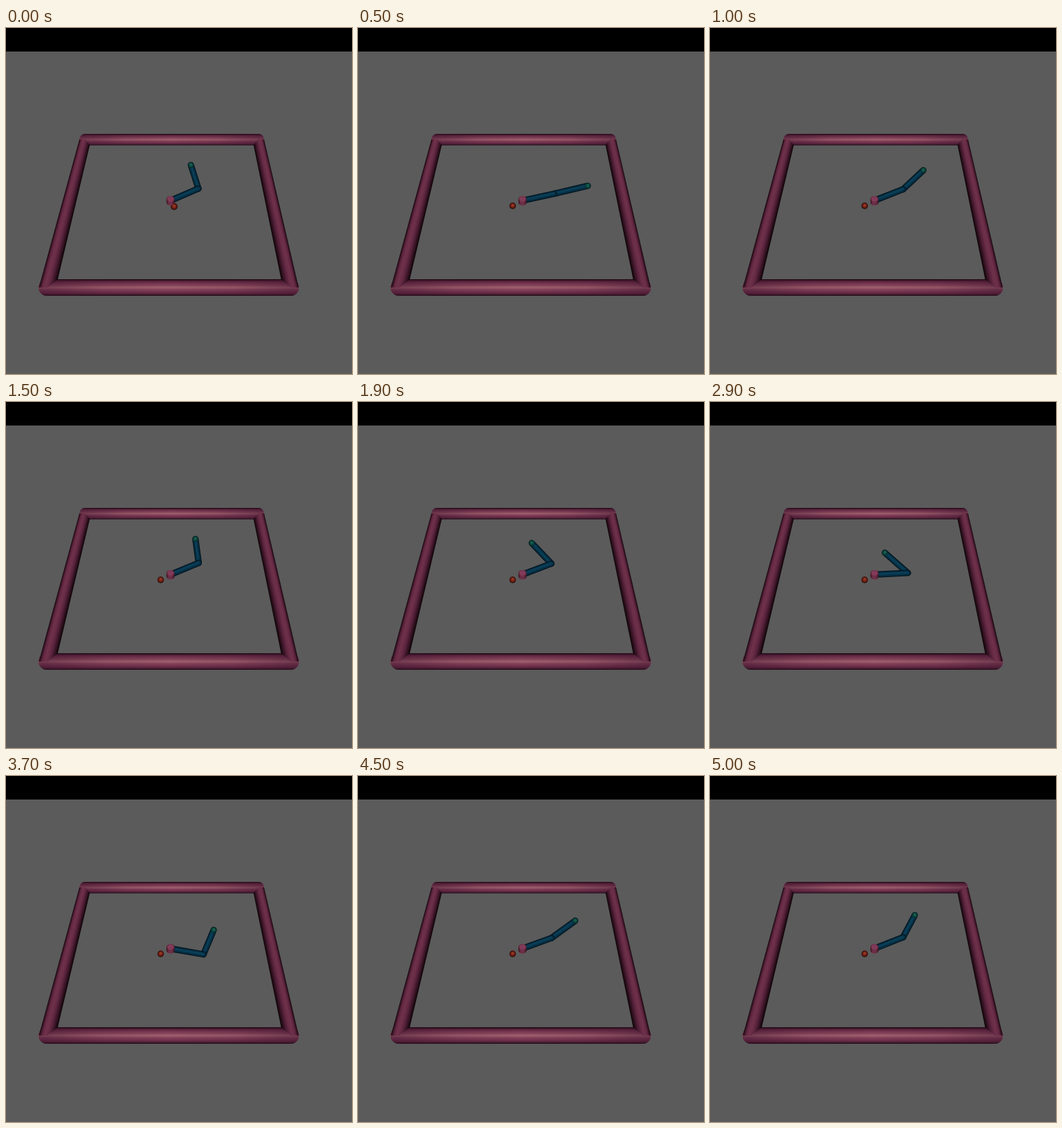
Recreate the animation shown at these times as an HTML page with a canvas. Size 500 px wide and 500 px high, loop 5100 ms.

```html
<!DOCTYPE html>
<html lang="en">
<head>
<meta charset="utf-8">
<title>Two-link arm</title>
<style>
html, body { margin: 0; width: 100%; height: 100%; overflow: hidden; background: #5b5b5b; }
canvas { display: block; width: 500px; height: 500px; }
</style>
</head>
<body>
<canvas id="stage" width="500" height="500"></canvas>
<script>
const ctx = document.getElementById('stage').getContext('2d');
const LOOP = 5100, STEP = 100;
const LINK = [0.1, 0.111];
const BACK = 161, FRONT = 375;

// time (ms), shoulder heading, forearm heading (degrees)
const keys = [
  [100, 2, 0], [500, 17, 18], [1000, 29, 51.7], [1900, 28, 121.5],
  [2400, 18, 130], [2900, 4, 127], [3300, -9, 103], [3700, -13.7, 70.4],
  [4200, 12, 49], [4500, 27, 45], [5000, 29, 67.4]
];

function slope(i, col) {
  const a = keys[Math.max(i - 1, 0)], b = keys[Math.min(i + 1, keys.length - 1)];
  return (b[col] - a[col]) / (b[0] - a[0]);
}

// Cubic Hermite through the keys
function sample(t, col) {
  let i = 0;
  while (i < keys.length - 2 && t > keys[i + 1][0]) i++;
  const a = keys[i], b = keys[i + 1], span = b[0] - a[0];
  const u = (t - a[0]) / span, v = 1 - u;
  return a[col] * (1 + 2 * u) * v * v + b[col] * u * u * (3 - 2 * u)
    + span * (slope(i, col) * u * v * v - slope(i + 1, col) * u * u * v);
}

// Perspective view of the table plane
function project(x, y) {
  const depth = 1 + 0.547 * y;
  return [237.5 + 486.6 * x / depth, -384.6 + 634 / depth];
}

function addStops(g, colors) {
  colors.forEach((c, i) => g.addColorStop(i / (colors.length - 1), c));
  return g;
}

const gradient = (x0, y0, x1, y1, colors) =>
  addStops(ctx.createLinearGradient(x0, y0, x1, y1), colors);

function ball(x, y, r, colors) {
  ctx.fillStyle = addStops(ctx.createRadialGradient(x, y - r * 0.25, 0, x, y, r), colors);
  ctx.beginPath();
  ctx.arc(x, y, r, 0, 7);
  ctx.fill();
}

function stroke(points, width, color) {
  ctx.lineCap = ctx.lineJoin = 'round';
  ctx.lineWidth = width;
  ctx.strokeStyle = color;
  ctx.beginPath();
  points.forEach(p => ctx.lineTo(...p));
  ctx.stroke();
}

// Edges are given as x at the back and front axes; the ends are mitred
function sideRail(outer, inner) {
  const at = (edge, y) => edge[0] + (edge[1] - edge[0]) * (y - BACK) / (FRONT - BACK);
  const axis = y => (at(outer, y) + at(inner, y)) / 2;
  const colors = ['#1a080f', '#5f2540', '#6f314a', '#682c46', '#522039', '#32111f', '#0a0306'];
  ctx.save();
  ctx.beginPath();
  ctx.moveTo(axis(BACK), BACK);
  ctx.lineTo(at(inner, 169), 169);
  ctx.lineTo(at(inner, 363), 363);
  ctx.lineTo(axis(FRONT), FRONT);
  ctx.lineTo(outer[1], FRONT);
  ctx.lineTo(outer[0], BACK);
  ctx.clip();
  for (let y = BACK; y < FRONT; y++) {
    ctx.fillStyle = gradient(at(outer, y), 0, at(inner, y), 0, colors);
    ctx.fillRect(0, y, 500, 1);
  }
  ctx.restore();
}

function crossRail(x, y, w, h) {
  ctx.fillStyle = gradient(0, y, 0, y + h,
    ['#12060b', '#5a233c', '#75364f', '#85445a', '#a3636f', '#85425b', '#75344f', '#5c263f', '#1a0a11']);
  ctx.beginPath();
  ctx.roundRect(x, y, w, h, h / 2);
  ctx.fill();
  ctx.fillStyle = gradient(x, 0, x + w, 0,
    ['rgba(55,15,40,.45)', 'rgba(55,15,40,.12)', 'rgba(55,15,40,0)', 'rgba(55,15,40,.12)', 'rgba(55,15,40,.45)']);
  ctx.fill();
}

function drawTable() {
  ctx.fillStyle = '#5b5b5b';
  ctx.fillRect(0, 0, 500, 500);
  ctx.fillStyle = '#000';
  ctx.fillRect(0, 0, 500, 34);
  crossRail(106, 153, 267, 16.5);
  crossRail(47, 363, 376.5, 24);
  sideRail([106, 47.5], [123, 72]);
  sideRail([373, 423], [356, 400]);
}

function drawLink(a, b) {
  stroke([a, b], 9.2, '#031722');
  stroke([a, b], 6.5, '#062f44');
  stroke([a, b].map(([x, y]) => [x - 0.2, y - 0.5]), 2.5, '#0a3f58');
}

function drawArm(shoulder, forearm) {
  const rad = Math.PI / 180;
  const ex = LINK[0] * Math.cos(shoulder * rad), ey = LINK[0] * Math.sin(shoulder * rad);
  const tx = ex + LINK[1] * Math.cos(forearm * rad), ty = ey + LINK[1] * Math.sin(forearm * rad);
  const base = project(0, 0), elbow = project(ex, ey), tip = project(tx, ty);
  drawLink(elbow, tip);
  drawLink(base, elbow);
  ball(...tip, 4, ['#176a58', '#0f5046', '#062722']);

  ctx.fillStyle = gradient(231.5, 0, 244, 0, ['#35131f', '#70304a', '#6c2e46', '#32121e']);
  ctx.beginPath();
  ctx.roundRect(231.8, 243, 12, 13.5, 5);
  ctx.fill();
  ctx.fillStyle = '#803a57';
  ctx.beginPath();
  ctx.ellipse(237.8, 247.3, 5, 3.8, 0, 0, 7);
  ctx.fill();
}

function draw(t) {
  const first = t < STEP;
  drawTable();
  ball(first ? 243 : 223.5, first ? 258 : 257, first ? 5 : 4.7,
    ['#a5432a', '#8a2d1c', '#641a10', '#1c0604']);
  if (first) drawArm(31, 100);
  else drawArm(sample(t, 1), sample(t, 2));
}

const start = performance.now();
function tick() {
  const t = (performance.now() - start) % LOOP;
  draw(Math.floor(t / STEP) * STEP);
  requestAnimationFrame(tick);
}
tick();
</script>
</body>
</html>
```
